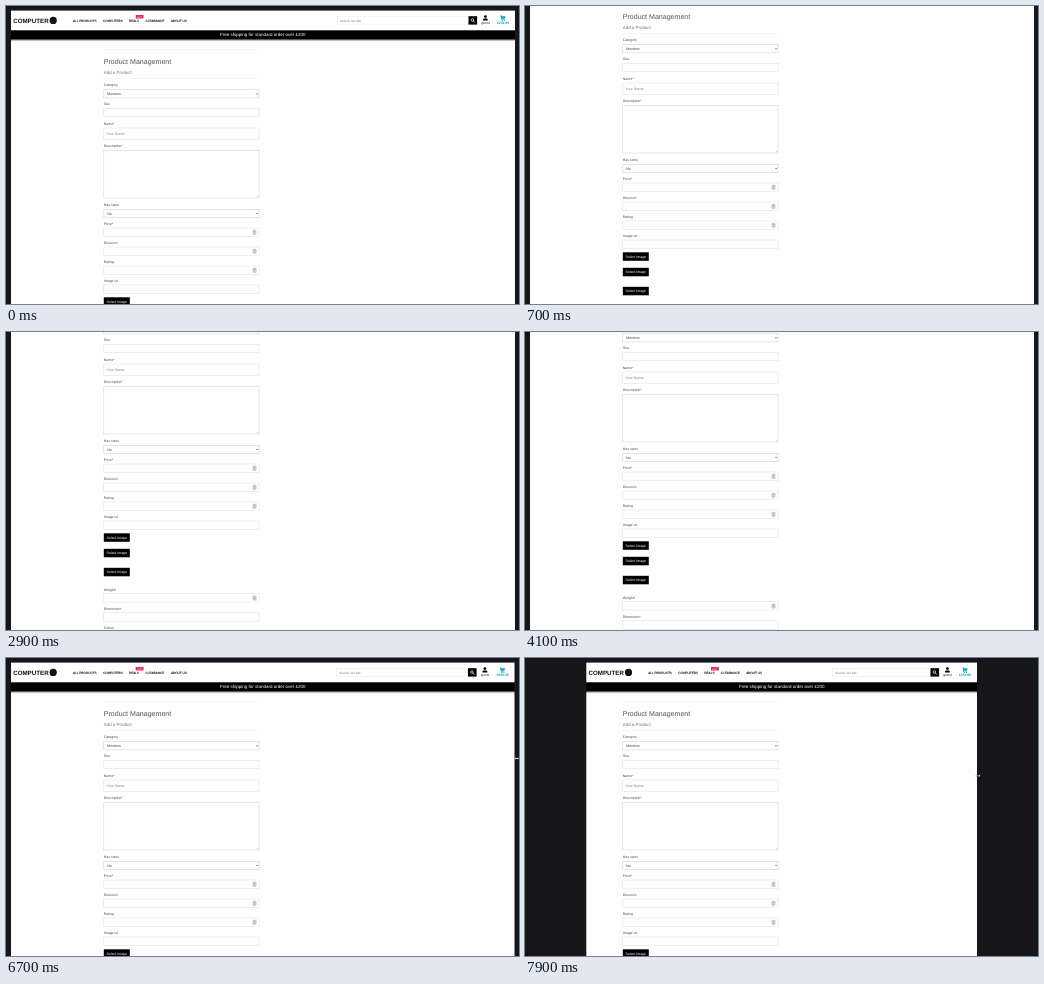
Recreate the animation shown at these times as an HTML page. Size 513 by 298 pixels, loop 8000 ms.

```html
<!DOCTYPE html>
<html lang="en">
<head>
<meta charset="utf-8">
<title>Product Management</title>
<style>
  html, body { margin: 0; width: 100%; height: 100%; overflow: hidden; background: #fff; }
  svg { display: block; width: 100%; height: 100%; }
  text { font-family: "Liberation Sans", Arial, sans-serif; text-rendering: geometricPrecision; }
</style>
</head>
<body>
<svg id="stage" viewBox="0 0 513 298" preserveAspectRatio="none">
  <defs>
    <linearGradient id="shade" x2="0" y2="1">
      <stop offset="0" stop-color="#777"/><stop offset="1" stop-color="#fff" stop-opacity="0"/>
    </linearGradient>
  </defs>
  <rect width="513" height="298" fill="#fefefe"/>
  <g id="form"></g>
  <g id="header">
    <rect width="513" height="25" fill="#fff"/>
    <rect y="24.3" width="513" height="9.4" fill="#000"/>
    <rect y="33.7" width="513" height="2.4" fill="url(#shade)"/>
    <text id="banner" y="30.4" font-size="4.5" fill="#fff" text-anchor="middle">Free shipping for standard order over £200</text>
    <g id="nav"></g>
    <g id="search">
      <rect id="box" y="10.4" height="8" fill="#fff" stroke="#e4e4e4" stroke-width=".4"/>
      <text x="2.5" y="15.6" font-size="3.2" fill="#777">Search our site</text>
    </g>
    <g id="tools">
      <rect x="-46.5" y="10.2" width="8.6" height="8.4" fill="#000"/>
      <circle cx="-42.6" cy="14" r="1.3" fill="none" stroke="#fff" stroke-width=".7"/>
      <path d="M-41.7 15l1.5 1.5" stroke="#fff" stroke-width=".8"/>
      <circle cx="-29.6" cy="10.6" r="1.4"/>
      <path d="M-32 14.6v-.8q0-1.4 1.4-1.4h2q1.4 0 1.4 1.4v.8z"/>
      <text x="-29.6" y="17.9" font-size="3.5" text-anchor="middle" fill="#222">guest</text>
      <g fill="#17a2b8">
        <path d="M-14.6 9.4h1.2l.3.8h3.7l-.7 2.6h-3.2l.2.7h3v.5h-3.5l-.9-4h-.1z"/>
        <circle cx="-12.6" cy="14.5" r=".6"/><circle cx="-10.5" cy="14.5" r=".6"/>
        <text x="-12" y="18" font-size="3.4" font-weight="bold" text-anchor="middle">£259.98</text>
      </g>
    </g>
    <rect width="513" height="4.6" fill="#17171b"/>
  </g>
  <rect id="leftPad" height="298" fill="#17171b"/>
  <rect id="rightPad" height="298" fill="#17171b"/>
  <rect id="floor" y="297" width="513" height="1" fill="#333"/>
  <path id="arrow" d="M0 0v5l1.1-1 .8 1.8.8-.4-.8-1.7h1.5z" fill="#fff" stroke="#333" stroke-width=".5"/>
  <path id="resize" d="M-2.4 0l1.4-1.2v.8h2v-.8l1.4 1.2-1.4 1.2v-.8h-2v.8z" fill="#eee" stroke="#333" stroke-width=".2"/>
</svg>
<script>
const $ = id => document.getElementById(id);
const LOOP = 8000, X = 97.8, W = 155.2;

const text = (x, y, size, s, fill = '#555', extra = '') =>
  `<text x="${x}" y="${y + size * .35}" font-size="${size}" fill="${fill}" ${extra}>${s}</text>`;
const box = (y, h, stroke = '#dedede') =>
  `<rect x="${X}" y="${y}" width="${W}" height="${h}" fill="#fefefe" stroke="${stroke}" stroke-width=".5"/>`;
const label = (y, s) => text(X, y, 3.5, s, '#4a4a4a');
const rule = y => `<path d="M${X} ${y}h${W}" stroke="#eaeaea" stroke-width=".5"/>`;
const select = (y, s) => box(y, 8.2, '#ccc') + text(101.3, y + 4.2, 3.5, s, '#333') +
  `<path d="M250.2 ${y + 3.6}l.9 1 .9-1" fill="none" stroke="#333" stroke-width=".6"/>`;
const number = y => box(y, 8.4) +
  `<rect x="247" y="${y + 2.3}" width="3" height="4" rx=".5" fill="#eee" stroke="#777" stroke-width=".4"/>` +
  `<path d="M247.8 ${y + 3.8}l.7-.8.7.8zm0 1l.7.8.7-.8z" fill="#555"/>`;
const button = y => `<rect x="${X}" y="${y}" width="26" height="8.5" fill="#000"/>` +
  text(110.8, y + 4.3, 3.5, 'Select Image', '#fff', 'text-anchor="middle"');

$('form').innerHTML = [
  rule(43.6),
  text(X, 55.2, 7.06, 'Product Management', '#555'),
  text(X, 66.7, 4.42, 'Add a Product', '#777'),
  rule(72.6),
  label(79, 'Category'), select(83.7, 'Monitors'),
  label(98.2, 'Sku'), box(102.5, 8.2),
  label(117.3, 'Name*'), box(122, 11.3), text(100.3, 127.7, 3.7, 'Your Name', '#8a8a8a'),
  label(139.6, 'Description*'), box(144.4, 47.6, '#d0d0d0'),
  '<path d="M250.8 191.4l1.6-1.6" stroke="#777" stroke-width=".4"/>',
  label(198.6, 'Has sizes'), select(203.3, 'No'),
  label(217.7, 'Price*'), number(222),
  label(236.7, 'Discount'), number(241),
  label(255.7, 'Rating'), number(260),
  label(274.8, 'Image url'), box(279, 8.4),
  ...[291.3, 306.8, 325.8].map(button),
  label(347.4, 'Weight*'), number(351.7),
  label(366.6, 'Dimension*'), box(370.8, 8.4),
  label(385.7, 'Colour'), box(390, 8.4)
].join('');

const links = [[62, 'ALL PRODUCTS'], [92, 'COMPUTERS'], [118, 'DEALS'], [134.5, 'CLEARANCE'], [160, 'ABOUT US']];
$('nav').innerHTML =
  text(2.2, 14.4, 6.2, 'COMPUTER', '#111', 'font-weight="bold"') +
  '<circle cx="42.2" cy="14.4" r="3.6" fill="#111"/>' +
  links.map(([x, s]) => text(x, 14.6, 3.1, s, '#111', 'stroke="#111" stroke-width=".08"')).join('') +
  '<rect x="124.7" y="8.9" width="7.8" height="3.6" rx=".5" fill="#e0245e"/>' +
  text(128.6, 10.7, 2.4, 'HOT', '#fff', 'text-anchor="middle"');

// Each track lists [time, value] pairs.
const tracks = {
  scroll: [[400, 0], [500, 4], [600, 25], [700, 45], [800, 47], [2300, 47], [2400, 47.5], [2500, 54],
    [2600, 66], [2800, 86], [2900, 90], [4000, 90], [4100, 82], [4200, 50], [5400, 50], [5500, 48.6],
    [5600, 42], [5700, 28], [5800, 13], [5900, 4], [6000, 0]],
  head: [[400, 0], [500, -4], [600, -25], [700, -37], [4000, -37], [4100, -35], [4200, 0]],
  left: [[7500, 5], [7600, 7], [7900, 61.3]],
  right: [[6600, 509], [6700, 508.5], [6800, 508], [7500, 508], [7600, 498.8], [7900, 452]],
  shift: [[7500, 0], [7600, -4], [7700, 0]],
  search: [[7600, 131], [7900, 97.5]],
  arrowX: [[2400, 504.2], [2900, 506], [4400, 501.8], [5500, 501.8], [6000, 508]],
  arrowY: [[2400, 108], [2900, 104], [4400, 97.8], [6000, 98]],
  resizeX: [[6400, 510.6], [7500, 510.6], [7600, 502], [7900, 453]],
  resizeY: [[7000, 100.5], [7600, 108.6], [7700, 112], [7900, 117.8]]
};

function at(name, t) {
  const keys = tracks[name], i = keys.findIndex(k => k[0] >= t);
  if (i < 0) return keys[keys.length - 1][1];
  if (!i) return keys[0][1];
  const [a, va] = keys[i - 1], [b, vb] = keys[i];
  return va + (vb - va) * (t - a) / (b - a);
}

const move = (id, x, y = 0) => $(id).setAttribute('transform', `translate(${x} ${y})`);
const show = (id, on) => $(id).setAttribute('visibility', on ? 'visible' : 'hidden');

function draw(time) {
  const t = Math.floor(time % LOOP / 100) * 100;
  const v = name => at(name, t);
  const left = v('left'), right = v('right'), shift = v('shift'), width = v('search');
  move('form', shift, -v('scroll'));
  move('header', 0, v('head'));
  move('nav', left);
  move('tools', right);
  move('search', right - 46.8 - width);
  $('box').setAttribute('width', width);
  $('banner').setAttribute('x', 256.8 + shift);
  $('leftPad').setAttribute('width', left);
  $('rightPad').setAttribute('x', right);
  $('rightPad').setAttribute('width', 513 - right);
  show('floor', t >= 2400 && t < 2500);
  move('arrow', v('arrowX'), v('arrowY'));
  show('arrow', t >= 2400 && t < 2900 || t >= 4400 && t < 6400);
  move('resize', v('resizeX'), v('resizeY'));
  show('resize', t >= 6400);
}

const start = performance.now();
(function tick() {
  draw(performance.now() - start);
  requestAnimationFrame(tick);
})();
</script>
</body>
</html>
```
